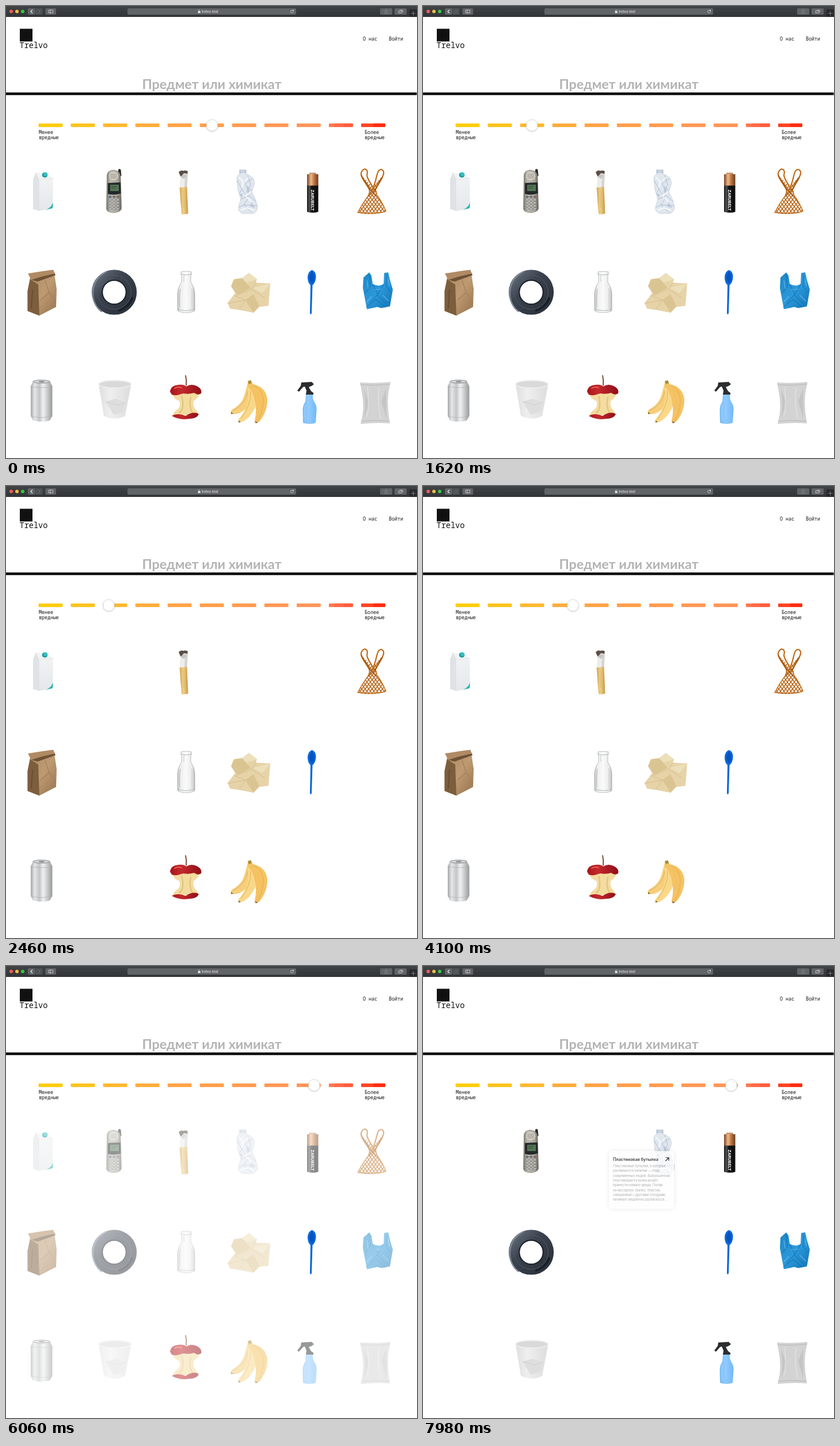
An HTML page that plays this animation: 714 px wide and 784 px high, repeating every 8000 ms.

```html
<!DOCTYPE html>
<html lang="ru">
<head>
<meta charset="utf-8">
<title>Каталог отходов</title>
<style>
html, body { margin: 0; width: 100%; height: 100%; overflow: hidden; background: #fff; }
svg { display: block; width: 714px; height: 784px; }
.mono { font: 500 8.3px "Noto Sans Mono", "DejaVu Sans Mono", monospace; fill: #111; }
.head { font: 700 23.2px Lato, Roboto, sans-serif; fill: #b3b3b3; text-anchor: middle; }
.ui { font: 500 6px Inter, sans-serif; fill: #e4e5e6; }
.card { font: 400 5.6px Inter, sans-serif; fill: #999; }
.line { fill: none; stroke-linecap: round; stroke-linejoin: round; }
</style>
</head>
<body>
<svg viewBox="0 0 714 784">
<defs>
  <linearGradient id="bar" x2="0" y2="1"><stop stop-color="#404446"/><stop offset="1" stop-color="#323537"/></linearGradient>
  <linearGradient id="milk" x2="0" y2="1"><stop stop-color="#f3f4f5"/><stop offset="1" stop-color="#e4e7e9"/></linearGradient>
  <linearGradient id="phone"><stop stop-color="#77736a"/><stop offset=".25" stop-color="#bdb9ae"/><stop offset=".75" stop-color="#aba79c"/><stop offset="1" stop-color="#625f58"/></linearGradient>
  <linearGradient id="filter"><stop stop-color="#d7ab59"/><stop offset=".45" stop-color="#efcf86"/><stop offset="1" stop-color="#c99a4d"/></linearGradient>
  <linearGradient id="kraft" x2="1" y2="1"><stop stop-color="#b08c64"/><stop offset=".5" stop-color="#bd9a72"/><stop offset="1" stop-color="#96734e"/></linearGradient>
  <linearGradient id="copper"><stop stop-color="#7a4321"/><stop offset=".35" stop-color="#f0b98a"/><stop offset=".6" stop-color="#c27c49"/><stop offset="1" stop-color="#6b3a1e"/></linearGradient>
  <linearGradient id="coal"><stop stop-color="#111"/><stop offset=".2" stop-color="#555"/><stop offset=".4" stop-color="#161616"/><stop offset="1" stop-color="#0c0c0c"/></linearGradient>
  <linearGradient id="metal"><stop stop-color="#a4a6a8"/><stop offset=".18" stop-color="#e6e7e8"/><stop offset=".4" stop-color="#c3c5c7"/><stop offset=".58" stop-color="#f0f1f1"/><stop offset=".8" stop-color="#c2c4c6"/><stop offset="1" stop-color="#97999b"/></linearGradient>
  <linearGradient id="glass"><stop stop-color="#bcbebe"/><stop offset=".15" stop-color="#eee"/><stop offset=".5" stop-color="#fafafa"/><stop offset=".85" stop-color="#e8e9e9"/><stop offset="1" stop-color="#b4b6b6"/></linearGradient>
  <linearGradient id="cup"><stop stop-color="#dedede"/><stop offset=".35" stop-color="#efefef"/><stop offset="1" stop-color="#dcdcdc"/></linearGradient>
  <linearGradient id="spray"><stop stop-color="#74b8f6"/><stop offset=".4" stop-color="#91cbff"/><stop offset="1" stop-color="#74b8f6"/></linearGradient>
  <linearGradient id="bag" x2="1" y2="1"><stop stop-color="#1c86c6"/><stop offset=".5" stop-color="#2b98da"/><stop offset="1" stop-color="#1273b4"/></linearGradient>
  <linearGradient id="tire" x2="1" y2="1"><stop stop-color="#626b77"/><stop offset=".35" stop-color="#3c444f"/><stop offset="1" stop-color="#2b313b"/></linearGradient>
  <linearGradient id="red"><stop stop-color="#a8141a"/><stop offset=".35" stop-color="#c42a2c"/><stop offset="1" stop-color="#8e0f18"/></linearGradient>
  <pattern id="mesh" width="6" height="8" patternUnits="userSpaceOnUse">
    <path d="M0 0L3 4L6 0M0 8L3 4L6 8" fill="none" stroke="#b9671a" stroke-width="1.6"/>
  </pattern>
  <filter id="soft" x="-30%" y="-30%" width="160%" height="160%"><feDropShadow dx="0" dy=".5" stdDeviation="1.2" flood-opacity=".3"/></filter>
  <filter id="halo" x="-30%" y="-30%" width="160%" height="160%"><feDropShadow dx="0" dy="0" stdDeviation="4" flood-opacity=".12"/></filter>
</defs>

<!-- browser bar -->
<rect width="714" height="19" fill="url(#bar)"/>
<circle cx="9" cy="9.5" r="3" fill="#fc5b57"/><circle cx="19" cy="9.5" r="3" fill="#f6be3b"/><circle cx="29" cy="9.5" r="3" fill="#34c84a"/>
<g fill="#626567">
  <rect x="38" y="4" width="12.5" height="11" rx="1.5"/><rect x="51" y="4" width="12.5" height="11" rx="1.5" fill="#505355"/>
  <rect x="68.5" y="4" width="18.5" height="11" rx="1.5"/><rect x="211" y="4" width="293" height="11" rx="2"/>
  <rect x="650" y="4" width="21" height="11" rx="1.5"/><rect x="675" y="4" width="21" height="11" rx="1.5"/>
</g>
<path d="M701 19V6H714V19Z" fill="#272a2c"/>
<g class="line" stroke="#e8e9ea" stroke-width=".9">
  <path d="M45.5 7L43 9.5L45.5 12" stroke-width="1.2"/>
  <path d="M56.5 7L59 9.5L56.5 12" stroke="#777a7c"/>
  <path d="M74.5 7H81.5V12H74.5ZM77 7V12" stroke-width=".7"/>
  <path d="M499.3 8.2A2.5 2.5 0 1 0 499.7 10M499.5 6.5V8.4H497.6" stroke-width=".7"/>
  <path d="M659 8.5H658V13H663V8.5H662M660.5 10.5V6M659.3 7.2L660.5 6L661.7 7.2" stroke="#8a8d8f" stroke-width=".7"/>
  <path d="M682.5 8.5H687.5V12H682.5ZM684.5 7H689.2V10.5" stroke-width=".7"/>
  <path d="M704 12.7H711M707.5 9.2V16.2" stroke="#8d9092" stroke-width=".8"/>
</g>
<rect x="333.5" y="9" width="4.2" height="3.3" rx=".4" fill="#e4e5e6"/><path d="M334.4 9V8A1.2 1.2 0 0 1 336.8 8V9" class="line" stroke="#e4e5e6" stroke-width=".7"/>
<text x="340" y="11.7" class="ui">trelvo.test</text>

<!-- page header -->
<rect x="24" y="39.5" width="22" height="22" fill="#111"/>
<text x="23.5" y="73" class="mono" style="font-size:13.6px;font-weight:400">Trelvo</text>
<text x="620" y="60" class="mono">О нас</text><text x="665" y="60" class="mono">Войти</text>
<text x="357.5" y="143.6" class="head">Предмет или химикат</text>
<path d="M0 150H713.5V154.5H0Z"/>

<!-- slider -->
<g id="scale"></g>
<g class="mono"><text x="57" y="222.3">Менее</text><text x="57" y="231">вредные</text><text x="623" y="222.3">Более</text><text x="623" y="231">вредные</text></g>
<circle id="knob" cy="207" r="9.8" fill="#fff" stroke="#d8d8d8" stroke-width=".7" filter="url(#soft)"/>

<g id="mild">
  <!-- milk carton -->
  <path d="M47 300L52 289L72 291L81.5 299V347Q81 350 78 351L58 355.5L47 352Z" fill="url(#milk)"/>
  <path d="M47 300L52 289L57 301V355L47 352Z" fill="#e0e3e6"/>
  <path d="M52 289L57 301L81.5 299M57 301V355" class="line" stroke="#d9dcdf" stroke-width=".7"/>
  <path d="M81.5 341Q78 351 68 354L80 351Q81.5 350 81.5 347Z" fill="#27b3b1"/>
  <ellipse cx="67.5" cy="293" rx="4.8" ry="4.6" fill="#16999b"/><ellipse cx="68.5" cy="292" rx="3.6" ry="3.2" fill="#35bfbd"/>
  <!-- cigarette -->
  <path d="M301.5 315L303 297L301 290Q309 288 316 290L314.5 314Z" fill="#ededed"/>
  <path d="M311 292L316 290L314.5 314H310Z" fill="#d6d5d4"/>
  <path d="M300 288Q304 284 308 286Q313 284 316 287L315 291L309 290L304 296L302 293Z" fill="#5b4e44"/>
  <path d="M304 297L308 291L314 294L309 300Z" fill="#c9c5c1"/>
  <path d="M301.5 315L314.5 313.5L316.5 360Q311 362 305 361Z" fill="url(#filter)"/>
  <path d="M304 322V344M309 320V352M313 325V348" class="line" stroke="#c4964a" stroke-width="1" stroke-dasharray="1 3"/>
  <!-- net bag -->
  <path d="M620 296L628 304L637 313L646 304L653 295L650 306L643 318L646 330Q655 343 661 356Q640 364 611 359Q620 342 629 329L631 318L624 306Z" fill="url(#mesh)"/>
  <g class="line" stroke="#c06c1a" stroke-width="2.2">
    <path d="M632 320C626 307 613 295 618 287C623 279 630 284 627 293C627 301 636 309 641 322"/>
    <path d="M635 320C644 306 643 290 648 285C654 281 658 287 655 294C652 304 643 312 641 321"/>
    <path d="M632 320L630 328Q619 343 611 358Q640 363 660 356Q654 341 645 329L641 320" stroke-width="1.4"/>
    <path d="M617 293L632 318M654 296L642 318M632 318L643 330M642 317L630 330" stroke="#95500f" stroke-width="1.2"/>
  </g>
  <!-- paper bag -->
  <path d="M42 470L84 464L88 491L87 522L58 537L37.5 529V494Z" fill="url(#kraft)"/>
  <path d="M42 474L56 483L58 537L37.5 529V494Z" fill="#7c5d3d"/>
  <path d="M38 464Q61 460 82 457.5L85 464Q64 468 44 475Z" fill="#b08a62"/>
  <path d="M44 475Q64 468 85 464L86 467L55 478Z" fill="#6f5236"/>
  <path d="M68 476L75 497L86 512M75 497L60 510" class="line" stroke="#a27f57" stroke-width="1.2"/>
  <path d="M46 492L44 524" class="line" stroke="#64492e" stroke-width="1.4"/>
  <!-- glass bottle -->
  <path d="M304 461Q313 459 322 461V466L321 467V479Q328 489 328 500V528Q327 531 313 532Q299 531 298 528V500Q298 489 305 479V467L304 466Z" fill="url(#glass)" stroke="#a2a4a4" stroke-width=".7"/>
  <path d="M304 465Q313 468 322 465M299.5 526Q313 531 326.500 526M303 491Q301 501 302 523" class="line" stroke="#9fa1a1" stroke-width=".8"/>
  <path d="M323 490V524M309 468V478" class="line" stroke="#d0d2d2" stroke-width="1.3"/>
  <!-- crumpled paper -->
  <path d="M385 515L398 498L391 486L396 474L410 472L422 463L436 474L434 480L459 481L456 520L440 522L430 532L404 527L389 525Z" fill="#e6d3a8"/>
  <path d="M391 486L396 474L410 472L425 489L402 501ZM430 532L416 510L430 500L440 520Z" fill="#dac492"/>
  <path d="M410 472L422 463L436 474L418 480ZM428 489L459 481L446 498Z" fill="#eddfba"/>
  <path d="M398 503L427 491L434 480M416 510L398 503M427 491L449 506M385 516L416 510L405 526" class="line" stroke="#cfb985" stroke-width=".8"/>
  <!-- can -->
  <path d="M47 650Q62 647 76 650L80.500 660V711L76 719Q62 723 47 719L43 711V660Z" fill="url(#metal)"/>
  <path d="M43 660Q62 664 80.500 660M43 711Q62 717 80.500 711" class="line" stroke="#aaacae" stroke-width=".7"/>
  <ellipse cx="61.5" cy="651.5" rx="14.5" ry="2.7" fill="#d7d8d9" stroke="#88898b" stroke-width="1"/><ellipse cx="62" cy="651.5" rx="5" ry="1" fill="#77797b"/>
  <!-- apple core -->
  <path d="M313 658Q314 649 312 641" class="line" stroke="#6b3c20" stroke-width="1.7"/>
  <path d="M288 671H337Q335 679 326 685Q324 691 328 698Q333 703 335 709L289 710Q292 703 300 698Q304 691 301 685Q290 681 288 671Z" fill="#f3dc9f"/>
  <path d="M305 677Q309 686 306 700L301 706M321 679Q317 693 324 706" class="line" stroke="#e2c07a" stroke-width="2"/>
  <path d="M285 669Q286 658 300 657Q309 656 313 660Q322 654 333 660Q341 665 339 672Q333 676 327 671Q317 674 308 672Q295 677 288 674Z" fill="url(#red)"/>
  <path d="M288 711Q298 705 312 711Q326 702 335 708Q331 716 318 716Q303 719 288 711Z" fill="url(#red)"/>
  <path d="M293 663Q298 660 305 662" class="line" stroke="#e76a5e" stroke-width="1.8"/>
  <!-- bananas -->
  <path d="M420 654L428 662Q429 690 411 703Q400 710 391 707Q389 702 394 699Q412 690 416 668Z" fill="#f6ce7c"/>
  <path d="M422 657L438 664Q441 690 423 712Q413 723 404 722Q402 717 407 713Q424 692 420 664Z" fill="#f9d88a"/>
  <path d="M420 651L425 649L429 656Q452 661 454 683Q454 704 440 721Q434 724 432 719Q438 695 427 668L420 660Z" fill="#f5c263"/>
  <path d="M430 658Q448 666 447 687Q446 705 437 720M425 668Q426 693 408 716M420 668Q417 690 394 702" class="line" stroke="#e0ab48" stroke-width=".9"/>
  <path d="M420 651L425 649L427 654L422 656Z" fill="#a98c40"/>
  <path d="M391 704L395 707L391 708ZM404 719L408 721L404 723ZM432 720L438 722L434 724Z" fill="#8a6b35"/>
</g>

<!-- spoon -->
<path d="M531.5 458Q538.5 460 538.5 470Q538 480 532.5 484L531 533Q529.5 536.5 528 533L529 484Q524 480 524 470Q525 460 531.5 458Z" fill="#0867dc"/>
<path d="M531.5 461Q536 464 535.5 471Q535 478 531.5 480Q527 477 527 470Q528 463 531.5 461Z" fill="#0653be"/>

<g id="harm">
  <!-- phone -->
  <path d="M194 294L195 284Q197 281 199.5 284L200.5 295Z" fill="#292a2c"/>
  <path d="M175.5 293Q176 285 187 284.5Q198 286 199 295L200.5 350Q201 357 188 358.5Q175 358 174.5 352Z" fill="url(#phone)" stroke="#77736a" stroke-width=".6"/>
  <ellipse cx="187" cy="295" rx="8.3" ry="7.5" fill="#d0ccc2"/>
  <path d="M182 292H192M181 295H193M182 298H192" class="line" stroke="#8d8a82" stroke-width="1"/>
  <path d="M177 307L199 306L199.5 325Q188 329 177 326Z" fill="#232a2a"/><path d="M181 310H196V321H181Z" fill="#557555"/>
  <path d="M183 313H193M183 316H190" stroke="#334b36" stroke-width="1"/>
  <g id="keys"></g>
  <!-- plastic bottle -->
  <path d="M405.5 285H417V291L423 294Q433 299 431 310L427 322L434 337L437 349Q436 358 429 360L411 360Q402 356 404 348L408 335L403 319L401 300Q401 294 406 291Z" fill="#e1e7ef" stroke="#c0c9d6" stroke-width=".7"/>
  <path d="M405 283.5H417.5V290H405Z" fill="#cad4e0"/>
  <path d="M407 285V290M416 285V290M402 303L410 318L406 324M428 299L415 309L427 320M408 335L423 329L434 339M410 318L421 334L413 345L427 358M405 349L413 345L436 346M420 294L425 310L418 323" class="line" stroke="#a3b1c3" stroke-width=".8"/>
  <path d="M405 297L412 305L410 314M424 323L416 329L426 339M408 354L418 350L430 354M421 298L415 303" class="line" stroke="#fff" stroke-width="1.6"/>
  <path d="M417 311L424 320L420 326ZM426 341L433 350L424 348ZM405 325L410 333L411 326Z" fill="#bcc8d7"/>
  <!-- battery -->
  <path d="M527 289H538.5V293H527Z" fill="#c49878"/><path d="M523 292Q533 290 542.5 292V312H523Z" fill="url(#copper)"/>
  <path d="M523 311.5H542.5V357Q533 360 523 357Z" fill="url(#coal)"/>
  <text transform="translate(530 318.5) rotate(90)" style="font:700 7.6px Roboto,sans-serif" fill="#fff">ZARUBELT</text>
  <!-- tire -->
  <circle cx="188" cy="496.5" r="29.4" fill="none" stroke="url(#tire)" stroke-width="19.4"/>
  <path d="M174 461Q149 474 151 504Q154 521 166 530" class="line" stroke="#7f8996" stroke-width="2.5" stroke-dasharray="1.5 2"/>
  <circle cx="188" cy="496.5" r="29.5" class="line" stroke="#4e5764" stroke-width="1"/>
  <circle cx="188" cy="496.5" r="21" class="line" stroke="#20252d" stroke-width="2"/>
  <path d="M197 528Q213 522 219 507" class="line" stroke="#1b2027" stroke-width="4"/>
  <!-- plastic bag -->
  <path d="M621 471L631 462L635 468L637 482Q648 488 656 482L657 463L664 462L667 475L672 492L667 521L652 524L645 522L627 526L623 505L620 489Z" fill="url(#bag)"/>
  <path d="M631 466L633 486L624 498M662 466L660 485L668 497M637 483L646 500L632 515M656 483L645 501L661 517M626 522L643 509L659 522" class="line" stroke="#1270b0" stroke-width="1"/>
  <path d="M627 476L629 490M640 492L652 491M635 504L627 513M655 502L664 511M664 474L666 486" class="line" stroke="#5cb4ea" stroke-width="1.2"/>
  <!-- cup -->
  <path d="M161 656L170 711Q189 720 207 711L217.5 656Z" fill="url(#cup)"/>
  <path d="M173 686L191 681L208 688L204 704L187 709Z" fill="#dedede"/><path d="M173 686L193 692L208 688" class="line" stroke="#d0d0d0" stroke-width="1"/>
  <ellipse cx="189.2" cy="656" rx="28" ry="6.5" fill="#d9d9d9" stroke="#eee" stroke-width="1.8"/>
  <!-- spray bottle -->
  <path d="M521 673H533Q532 682 537 689Q540 694 539.5 702L538 723Q527 727 516 723L515.5 700Q516 692 520 686Z" fill="url(#spray)"/>
  <path d="M520 692Q518 704 520 720" class="line" stroke="#a6d5ff" stroke-width="1.2"/>
  <path d="M513 653L531 652L535 656L531 659L526 661L530 668L534 671V674H521L522 667L519 660L516 661L509 669L506 667L512 659Z" fill="#2b2d30"/>
  <!-- foil bag -->
  <path d="M615 653Q641 655 668 652L665 667Q661 690 667 724Q641 722 616 725Q624 698 618 669Z" fill="#d3d3d3"/>
  <path d="M622 664Q626 690 622 715L631 690ZM660 663L652 686L661 716Z" fill="#c5c5c5"/>
  <path d="M628 661Q632 692 627 712M648 662Q645 687 651 716" class="line" stroke="#e0e0e0" stroke-width="1.6"/>
  <path d="M616 657Q641 659 667 656M617 720Q641 718 666 720" class="line" stroke="#b8b8b8" stroke-width="1"/>
</g>

<g id="card">
  <rect x="323" y="321" width="113" height="100" rx="6" fill="#fff" fill-opacity=".92" filter="url(#halo)"/>
  <text x="330" y="338" style="font:600 7.2px Inter,sans-serif" fill="#111">Пластиковая бутылка</text>
  <path d="M421.5 338L427 332.5M422 332.5H427V337.5" class="line" stroke="#111" stroke-width="1.2"/>
  <g id="note" class="card"></g>
</g>
</svg>
<script>
const $ = id => document.getElementById(id);

const colors = ['#ffcc0c', '#fdc31d', '#ffb830', '#ffac3c', '#ffa346', '#ff9e4a', '#ff9b4f', '#ff9856', '#ff965a', '#ff774d', '#ff4322'];
const bar = (x, w, c) => `<rect x="${x}" y="203.8" width="${w}" height="6.2" rx="1" fill="${c}"/>`;
$('scale').innerHTML = colors.map((c, i) => bar(56.6 + 56.04 * i, 41.7, c)).join('')
  + bar(571, 16, '#ff6946') + bar(586, 16.5, '#ff5c3c') + bar(638, 20.7, '#ff2b10');

let keys = '';
for (let i = 0; i < 15; i++) {
  const row = Math.floor(i / 3), col = i % 3;
  const fill = row ? '#d6d6d2' : ['#55749a', '#767a78', '#b75d52'][col];
  keys += `<ellipse cx="${181 + col * 6.7}" cy="${331 + row * 5.2}" rx="2.4" ry="1.6" fill="${fill}" stroke="#5f6870" stroke-width=".8"/>`;
}
$('keys').innerHTML = keys;

const note = ['Пластиковые бутылки, в которые', 'разливаются напитки — беда', 'современных людей. Выброшенная',
  'пластиковая бутылка может', 'принести немало вреда. Попав', 'на мусорную свалку, пластик,',
  'смешанный с другими отходами,', 'начинает медленно разлагаться...'];
$('note').innerHTML = note.map((s, i) => `<text x="330" y="${349 + 8.35 * i}">${s}</text>`).join('');

// start, number of 40 ms steps, distance
const moves = [[500, 10, -66], [1020, 21, -110], [2140, 9, -3.5], [4060, 7, 173.5],
  [4500, 8, 105], [4980, 11, 78], [5980, 10, 0.5]];

const progress = (t, start, steps) =>
  Math.min(1, Math.max(0, (Math.floor((t - start) / 40) + 1) / steps));
const ease = (t, start, steps) => 1 - (1 - progress(t, start, steps)) ** 1.9;

function draw(now) {
  const t = now % 8000;
  const back = ease(t, 5980, 10);
  $('knob').setAttribute('cx', moves.reduce((x, [start, steps, dist]) => x + dist * ease(t, start, steps), 358));
  $('harm').style.opacity = 1 - ease(t, 2140, 9) + back;
  $('mild').style.opacity = 1 - back;
  $('card').style.opacity = 0.82 * progress(t, 7900, 3);
  requestAnimationFrame(draw);
}
draw(performance.now());
</script>
</body>
</html>
```
